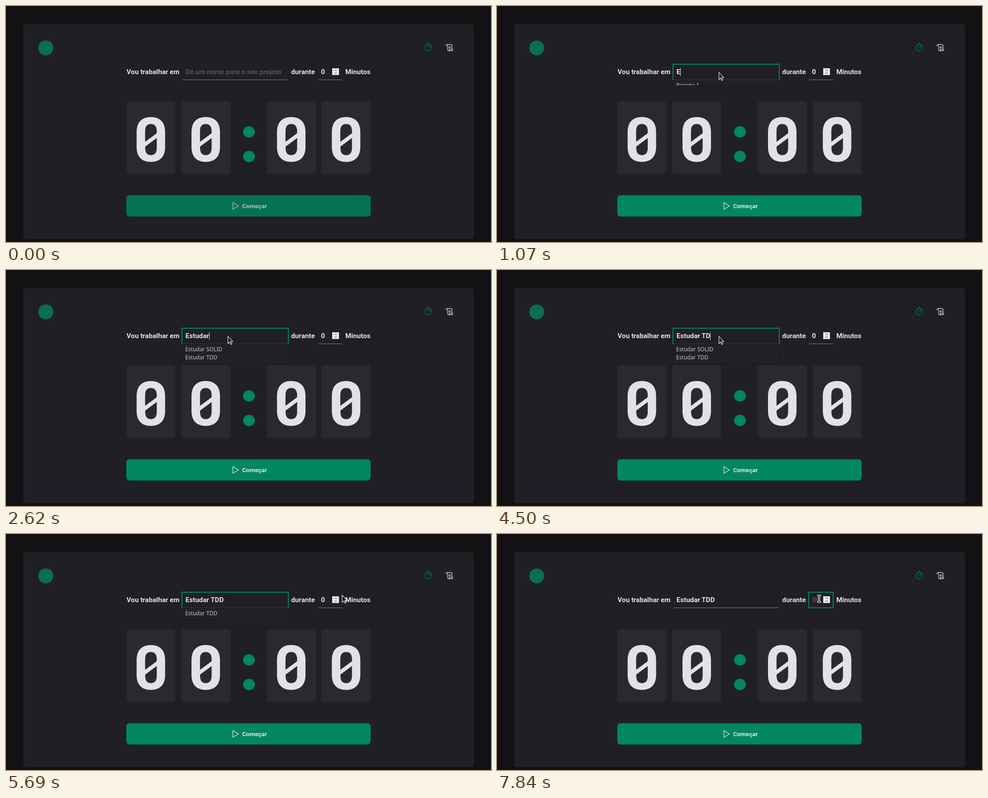
Write an HTML page that moves like this. It is 1072 px wide and 523 px high and loops after 8 s.

```html
<!DOCTYPE html>
<html lang="pt-BR">
<head>
<meta charset="utf-8">
<title>Timer</title>
<style>
  html, body { margin: 0; width: 100%; height: 100%; overflow: hidden; background: #121214; }
  svg { display: block; }
  text { fill: #e1e1e6; font: bold 15.16px Roboto, sans-serif; white-space: pre; }
  .hint { fill: #525259; }
  .start { font-size: 13.47px; }
  .option { fill: #c4c4cc; font: 12.1px "Noto Sans", sans-serif; }
  .line { fill: none; stroke-linecap: round; stroke-linejoin: round; }
  .ring { fill: none; stroke: #00875f; stroke-width: 2; }
  .rule { fill: #7c7c8a; }
  #list { filter: drop-shadow(0 0 1.5px rgba(0, 0, 0, .45)); }
</style>
</head>
<body>
<svg width="1072" height="523" viewBox="0 0 1072 523">
  <defs>
    <g id="digit">
      <rect x="-54" width="108" height="162" rx="6.7" fill="#29292e"/>
      <path fill="#e1e1e6" fill-rule="evenodd" d="M-31.5 69C-31.5 47-20 35.5 0 35.5S31.5 47 31.5 69V102C31.5 123.500 20 135 0 135S-31.500 123.500-31.500 102Z
        M-12.700 90.500L13 71.500V67C13 56 8.500 51 0 51S-12.700 56-12.700 67Z
        M13 82L-12.500 101V104C-12.500 115-8 120 0 120S13 115 13 104Z"/>
    </g>
  </defs>

  <rect x="38" y="40" width="996.500" height="477" rx="6.700" fill="#202024"/>
  <circle cx="88" cy="93" r="16.500" fill="#0a6e50"/>

  <g class="line" stroke-width="16">
    <g transform="translate(923.400 82.300) scale(.079)" stroke="#00875f">
      <circle cx="128" cy="128" r="88"/>
      <path d="M128 128L168 88M104 8h48"/>
    </g>
    <g transform="translate(969.900 82.300) scale(.079)" stroke="#e1e1e6">
      <path d="M37 79A24 24 0 1 1 80 64V192a24 24 0 1 0 43-15H219A24 24 0 0 1 200 216H104M56 40H176a24 24 0 0 1 24 24V176M112 104h56M112 136h56"/>
    </g>
  </g>

  <text x="266.500" y="151.400">Vou trabalhar em</text>
  <text x="630.300" y="151.400">durante</text>
  <text x="750" y="151.400">Minutos</text>

  <use href="#digit" x="320.200" y="210.500"/>
  <use href="#digit" x="441.500" y="210.500"/>
  <use href="#digit" x="630.500" y="210.500"/>
  <use href="#digit" x="751.700" y="210.500"/>
  <g fill="#00875f">
    <rect x="524" y="266.500" width="26" height="25" rx="12.500"/>
    <rect x="524" y="321" width="26" height="25" rx="12.500"/>
  </g>

  <g id="button">
    <rect x="266" y="419.500" width="540" height="47" rx="6.700" fill="#00875f"/>
    <path class="line" stroke="#e1e1e6" stroke-width="1.300" d="M501.500 435.600V450.400L514 443Z"/>
    <text class="start" x="522" y="447.800">Começar</text>
  </g>

  <rect id="taskRule" class="rule" x="390" y="163" width="233" height="1"/>
  <rect id="taskRing" class="ring" x="389" y="129" width="235" height="34.500"/>
  <text id="hint" class="hint" x="396.700" y="151.400">Dé um nome para o seu projeto</text>
  <text id="task" x="396.700" y="151.400"></text>

  <rect id="minRule" class="rule" x="689" y="163" width="54" height="1"/>
  <rect id="minRing" class="ring" x="689" y="129" width="54" height="34.500"/>
  <text id="minutes" x="696.200" y="151.400"></text>
  <rect x="721" y="138" width="15" height="15" fill="#e9e9ed"/>
  <path class="line" stroke="#77777c" stroke-width="1.100" d="M726.300 143.500l2.200-2.200 2.200 2.200M726.300 148l2.200 2.200 2.200-2.200"/>

  <rect id="caret" y="137.500" width="1" height="17.500" fill="#e1e1e6"/>

  <g id="list">
    <svg id="popup" x="390" y="163" width="232">
      <rect width="232" height="100%" fill="#222226"/>
      <g id="options"></g>
    </svg>
  </g>

  <path id="arrow" d="M.500 0V16L4.300 12.500L6.800 18L9.200 17L6.700 11.600H11.300Z" fill="#121214" stroke="#fff" stroke-width="1.100" stroke-linejoin="round"/>
  <g id="beam" class="line">
    <path id="bar" d="M-2.500-7H-1L0-6 1-7H2.500M0-6V6M-2.500 7H-1L0 6 1 7H2.500" stroke="#fff" stroke-width="3.400"/>
    <use href="#bar" style="stroke:#000"/>
    <path d="M-2.500-7H-1L0-6 1-7H2.500M0-6V6M-2.500 7H-1L0 6 1 7H2.500" stroke="#000" stroke-width="1.300"/>
  </g>
</svg>

<script>
const LOOP = 8000;
const $ = id => document.getElementById(id);
const show = (id, on) => $(id).setAttribute('visibility', on ? 'visible' : 'hidden');
const NAMES = ['Estudar SOLID', 'Es', 'Esse projeto é um dos mais difícil', 'Estudar TDD'];

// time, typed text, caret shown
const TYPING = [
  [0, '', 0], [250, '', 1], [1070, 'E', 1], [1340, 'Es', 1], [1400, 'Es', 0],
  [2020, 'Est', 1], [2220, 'Estu', 1], [2430, 'Estud', 1], [2500, 'Estuda', 1],
  [2620, 'Estudar', 1], [3300, 'Estudar ', 1], [3730, 'Estudar T', 1],
  [4500, 'Estudar TD', 1], [4560, 'Estudar TDD', 1], [4880, 'Estudar TDD', 0],
  [6020, 'Estudar TDD', 1], [6680, 'Estudar TDD', 0], [7610, 'Estudar TDD', 1],
  [7840, 'Estudar TDD', 0]
];

// time, options in the popup
const LISTS = [
  [0, []], [1070, ['Projeto 1', ...NAMES]], [1340, NAMES],
  [2080, [NAMES[0], NAMES[3]]], [4630, [NAMES[3]]], [6620, []]
];

// time, pointer x, y
const POINTER = [
  [5120, 490, 147], [5200, 530, 144], [5300, 640, 135], [5400, 765, 129],
  [5480, 812, 128], [5560, 800, 130], [5690, 742.500, 135.500], [5770, 731, 138],
  [6020, 731, 138], [6170, 719, 141], [6320, 712, 143.500]
];

const at = (table, t) => table.findLast(row => row[0] <= t);

function along(path, t) {
  const i = path.findIndex(p => p[0] > t);
  if (i === 0) return path[0].slice(1);
  if (i < 0) return path.at(-1).slice(1);
  const [a, b] = [path[i - 1], path[i]];
  const k = (t - a[0]) / (b[0] - a[0]);
  return [1, 2].map(n => a[n] + (b[n] - a[n]) * k);
}

function drawList(t) {
  const items = at(LISTS, t)[1];
  const opening = Math.min(1, .12 + Math.max(0, t - 1070) / 200);
  show('list', items.length);
  $('popup').setAttribute('height', (7 + 18.900 * items.length) * opening);
  const key = items.join();
  if ($('options').dataset.key === key) return;
  $('options').dataset.key = key;
  $('options').innerHTML = items.map((s, i) =>
    `<text class="option" x="6" y="${16.500 + 18.800 * i}">${s}</text>`).join('');
}

function draw(t) {
  const [, typed, caret] = at(TYPING, t);
  const onMinutes = t >= 6680;
  const onTask = t >= 250 && !onMinutes;
  const cleared = t >= 7610;

  $('task').textContent = typed;
  show('hint', !typed);
  show('taskRing', onTask);
  show('taskRule', !onTask);
  show('minRing', onMinutes);
  show('minRule', !onMinutes);
  $('minutes').textContent = cleared ? '00' : '0';
  $('minutes').setAttribute('class', cleared ? 'hint' : '');
  $('button').setAttribute('opacity', typed ? 1 : .8);

  const end = typed ? $('task').getComputedTextLength() : 0;
  $('caret').setAttribute('x', Math.round(onMinutes ? 696 : 396.500 + end));
  show('caret', caret);
  drawList(t);

  const [x, y] = along(POINTER, t);
  const inField = t >= 6320;
  show('arrow', t >= 1070 && !inField);
  show('beam', inField);
  $(inField ? 'beam' : 'arrow').setAttribute('transform', `translate(${x} ${y})`);
}

const start = performance.now();
function tick() {
  draw((performance.now() - start) % LOOP);
  requestAnimationFrame(tick);
}
tick();
</script>
</body>
</html>
```
